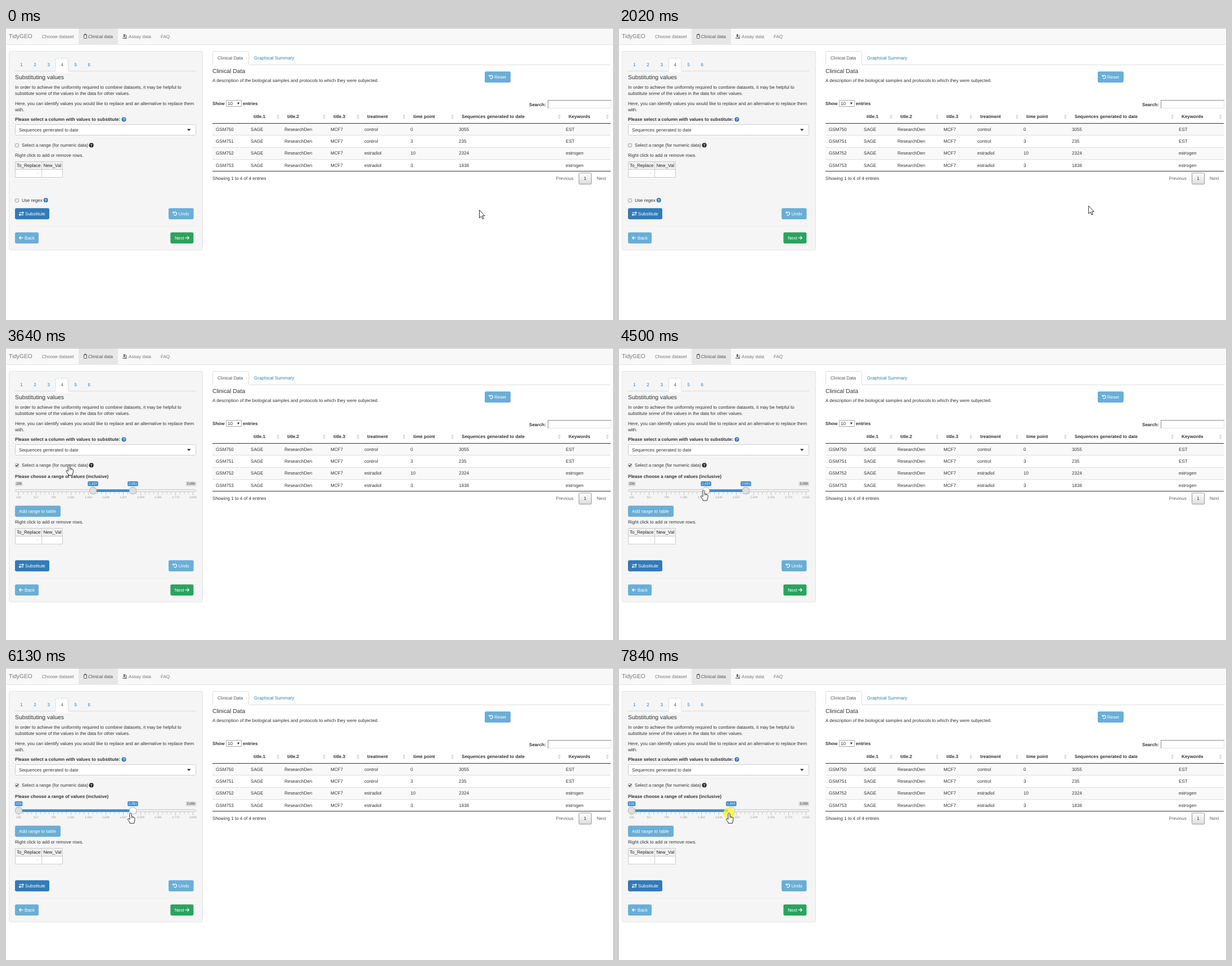
An HTML page with a canvas that plays this animation: 1079 px wide and 519 px high, repeating every 8000 ms.

```html
<!DOCTYPE html>
<html lang="en">
<head>
<meta charset="utf-8">
<title>TidyGEO</title>
<style>
html, body { margin: 0; width: 100%; height: 100%; overflow: hidden; background: #fff; }
canvas { display: block; }
</style>
</head>
<body>
<canvas id="stage" width="1079" height="519"></canvas>
<script>
const ctx = document.getElementById('stage').getContext('2d');
const LOOP = 8000, STEP = 77.4;
const BODY = 8.07, HEAD = 10.37;
const INK = '#333', LINK = '#337ab7', SKY = '#6aaed6', BAR = '#428bca';

function text(str, x, y, { size = BODY, color = INK, bold = false, align = 'left' } = {}) {
  ctx.font = `${bold ? 'bold ' : ''}${size}px "Liberation Sans", Arial, sans-serif`;
  ctx.fillStyle = color;
  ctx.textAlign = align;
  ctx.fillText(str, x, y);
}

function rect(x, y, w, h, color) {
  ctx.fillStyle = color;
  ctx.fillRect(x, y, w, h);
}

function pill(x, y, w, h, r, fill) {
  ctx.beginPath();
  ctx.roundRect(x, y, w, h, r);
  ctx.fillStyle = fill;
  ctx.fill();
}

function box(x, y, w, h, fill, stroke, r = 0) {
  pill(x + .5, y + .5, w - 1, h - 1, r, fill);
  ctx.strokeStyle = stroke;
  ctx.lineWidth = 1;
  ctx.stroke();
}

// Triangle with a flat base of width 2 * half centred on (x, y); negative height points up.
function triangle(x, y, half, height, fill) {
  ctx.beginPath();
  ctx.moveTo(x - half, y);
  ctx.lineTo(x + half, y);
  ctx.lineTo(x, y + height);
  ctx.fillStyle = fill;
  ctx.fill();
}

function line(points, color, width = 1) {
  ctx.beginPath();
  points.forEach(([x, y]) => ctx.lineTo(x, y));
  ctx.strokeStyle = color;
  ctx.lineWidth = width;
  ctx.stroke();
}

function arc(x, y, r, start, end, color, width) {
  ctx.beginPath();
  ctx.arc(x, y, r, start, end);
  ctx.strokeStyle = color;
  ctx.lineWidth = width;
  ctx.stroke();
}

function disc(x, y, r, fill) {
  ctx.beginPath();
  ctx.arc(x, y, r, 0, Math.PI * 2);
  ctx.fillStyle = fill;
  ctx.fill();
}

function help(x, y, color) {
  disc(x, y, 4, color);
  text('?', x, y + 2.4, { size: 6.8, color: '#fff', bold: true, align: 'center' });
}

function checkbox(x, y, checked) {
  box(x, y, 7, 7, checked ? '#fff' : '#ececec', '#a3a3a3', 1);
  if (checked) line([[x + 1.5, y + 3.5], [x + 3, y + 5], [x + 5.7, y + 1.6]], '#222', 1.3);
}

function undoIcon(x, y) {
  arc(x, y, 2.9, -2.5, 2.4, '#fff', 1.2);
  line([[x - 3.4, y - 4], [x - 3.4, y - 1], [x - .4, y - 1]], '#fff', 1.2);
}

// Horizontal arrow whose head points along dir (1 right, -1 left).
function arrowIcon(x, y, dir, half, head) {
  const tip = x + dir * half;
  line([[x - dir * half, y], [tip, y]], '#fff', 1.2);
  line([[tip - dir * head, y - head], [tip, y], [tip - dir * head, y + head]], '#fff', 1.2);
}

function button(label, x, y, w, textX, fill) {
  pill(x, y + .2, w, 19.7, 2.3, fill);
  text(label, textX, y + 12.6, { color: '#fff' });
}

function navbar() {
  rect(0, 0, 1079, 29, '#f8f8f8');
  rect(0, 29, 1079, 1, '#e5e5e5');
  rect(129, 0, 70, 29, '#e7e7e7');
  rect(0, 0, 1079, 1, '#c4c4c4');
  const grey = { color: '#777' };
  text('TidyGEO', 5, 18, { size: 10.25, color: '#777' });
  text('Choose dataset', 64, 17.6, grey);
  text('Clinical data', 146, 17.6, { color: '#555' });
  text('Assay data', 218, 17.6, grey);
  text('FAQ', 275, 17.6, grey);
  box(138, 11, 6, 8, '#e7e7e7', '#555', 1);
  rect(139.5, 10.5, 3, 2.2, '#555');
  rect(207, 17.5, 8, 1.3, '#666');
  rect(209, 11, 2.6, 5, '#666');
  arc(211, 15, 3, -1, 1.4, '#666', 1.1);
}

function tab(x, y, w, h) {
  box(x, y, w, h + 2, '#fff', '#ddd', 2);
  rect(x, y + h, w, 3, '#fff');
}

const COLUMNS = [
  ['title.1', 435], ['title.2', 495], ['title.3', 577], ['treatment', 637],
  ['time point', 719], ['Sequences generated to date', 805], ['Keywords', 995]
];
const ROWS = [
  ['GSM750', 'control', '0', '3055', 'EST'],
  ['GSM751', 'control', '3', '235', 'EST'],
  ['GSM752', 'estradiol', '10', '2324', 'estrogen'],
  ['GSM753', 'estradiol', '3', '1838', 'estrogen']
];
const TABLE = { x: 367, y: 169, w: 708, row: 21.3 };

function dataTable(pointer) {
  const { x: left, y: head, w, row } = TABLE;
  const hovered = pointer.x > left ? Math.floor((pointer.y - head) / row) : -1;
  COLUMNS.forEach(([title, x], i) => {
    const next = COLUMNS[i + 1]?.[1] ?? 1080.5;
    text(title, x + 5, 160, { bold: true });
    triangle(next - 11.5, 157, 2.3, -3.3, '#d0d0d0');
    triangle(next - 11.5, 158.4, 2.3, 3.3, '#d0d0d0');
  });
  ROWS.forEach(([id, treatment, time, sequences, keyword], r) => {
    const top = head + r * row, y = top + 13.8;
    if (r === hovered) rect(left, top, w, row, '#f3f3f3');
    else if (r % 2 === 0) rect(left, top, w, row, '#f9f9f9');
    if (r) rect(left, Math.round(top), w, 1, '#ddd');
    text(id, 373, y);
    ['SAGE', 'ResearchDen', 'MCF7', treatment, time, sequences, keyword]
      .forEach((value, i) => text(value, COLUMNS[i][1], y));
  });
  rect(left, head, w, 1, '#333');
  rect(left, 254, w, 1, '#333');
}

function dataPane(pointer) {
  rect(367, 65, 708, 1, '#ddd');
  tab(367, 41, 65, 24);
  text('Clinical Data', 376, 56, { color: '#555' });
  text('Graphical Summary', 441, 56, { color: LINK });
  text('Clinical Data', 367, 79.5, { size: HEAD });
  text('A description of the biological samples and protocols to which they were subjected.', 367, 96.4);
  button('Reset', 851, 77, 46, 868, SKY);
  undoIcon(862.5, 87);

  const bold = { bold: true };
  text('Show', 367, 136.5, bold);
  box(391, 128, 28, 12, '#fff', '#aaa');
  text('10', 394, 136.7);
  triangle(413, 132.5, 2, 3.5, '#222');
  text('entries', 421, 136.5, bold);
  text('Search:', 930, 138.5, bold);
  box(963, 128, 113, 15, '#fff', '#e3e3e3');
  rect(963, 128, 113, 1, '#8c8c8c');
  rect(963, 128, 1, 15, '#8c8c8c');

  dataTable(pointer);

  text('Showing 1 to 4 of 4 entries', 367, 269.6);
  text('Previous', 977.5, 270.2, { color: '#666' });
  const shade = ctx.createLinearGradient(0, 257, 0, 278);
  shade.addColorStop(0, '#fff');
  shade.addColorStop(1, '#dcdcdc');
  box(1018, 257, 23, 21, shade, '#979797', 1);
  text('1', 1029.5, 270.2, { align: 'center' });
  text('Next', 1050, 270.2, { color: '#666' });
}

const MIN = 235, MAX = 3055, TRACK = 22.5, SPAN = 310;
const valueX = v => TRACK + (v - MIN) / (MAX - MIN) * SPAN;
const xValue = x => Math.round(Math.min(MAX, Math.max(MIN, MIN + (x - TRACK) / SPAN * (MAX - MIN))));
const commas = v => Math.round(v).toLocaleString('en-US');

// Value bubble; anchor 0, .5 or 1 pins its left, middle or right to x.
function tag(value, x, fill, color, anchor = .5) {
  const str = commas(value), size = 5.9;
  ctx.font = `${size}px "Liberation Sans", Arial, sans-serif`;
  const w = ctx.measureText(str).width + 3.8, left = x - w * anchor;
  pill(left, 237, w, 8.6, 1.8, fill);
  text(str, left + w / 2, 243.4, { size, color, align: 'center' });
}

function slider(from, to, pointer) {
  const a = valueX(from), b = valueX(to);
  box(16, 251, 322, 5, '#eee', '#ccc', 2);
  rect(a, 251.3, b - a, 4.6, BAR);
  for (let i = 0; i <= 40; i++) {
    const major = i % 4 === 0, x = TRACK + i * SPAN / 40;
    rect(x - .3, 256.5, .6, major ? 5 : 3, '#999');
    if (major) text(commas(MIN + i * 70.5), x, 267.2, { size: 5.2, color: '#999', align: 'center' });
  }
  if (a > 42) tag(MIN, 16, '#dcdcdc', INK, 0);
  tag(MAX, 338, '#dcdcdc', INK, 1);
  for (const [value, x] of [[from, a], [to, b]]) {
    const hover = Math.hypot(pointer.x - x, pointer.y - 253.5) < 7.5;
    tag(value, x, BAR, '#fff');
    disc(x, 253.5, 6.7, '#a9a9a9');
    disc(x, 253.5, 5.9, hover ? '#fff' : '#dedede');
  }
}

function entryTable(y) {
  text('Right click to add or remove rows.', 16, y - 7.8);
  box(16, y, 85, 15, '#f0f0f0', '#ccc');
  box(16, y + 14, 85, 15, '#fff', '#ccc');
  rect(63, y, 1, 29, '#ccc');
  text('To_Replace', 19, y + 10, { color: '#222' });
  text('New_Val', 66.5, y + 10, { color: '#222' });
  triangle(56.1, y + 20, 1.6, 3, '#e4e4e4');
}

function sidePanel(s) {
  const shift = s.open ? 57 : 0;
  box(5, 41, 345, 354 + shift, '#f5f5f5', '#e3e3e3', 2);
  rect(16, 76, 322, 1, '#ddd');
  tab(88, 53, 23, 23);
  for (let i = 1; i <= 6; i++) {
    text(i, 3.5 + i * 24.05, 67.7, { color: i === 4 ? '#555' : LINK, align: 'center' });
  }
  text('Substituting values', 16, 91, { size: HEAD });
  text('In order to achieve the uniformity required to combine datasets, it may be helpful to', 16, 107.7);
  text('substitute some of the values in the data for other values.', 16, 119.3);
  text('Here, you can identify values you would like to replace and an alternative to replace them', 16, 136.6);
  text('with.', 16, 148.2);
  text('Please select a column with values to substitute:', 16, 165.2, { bold: true });
  help(209.5, 162.5, LINK);
  box(16, 171, 322, 20, '#fff', '#ccc', 2);
  text('Sequences generated to date', 23, 183.7);
  triangle(325.2, 179.5, 3.3, 3.5, '#222');
  checkbox(16, 205, s.checked);
  text('Select a range (for numeric data)', 28, 211);
  help(151.7, 208.2, '#222');

  if (s.open) {
    text('Please choose a range of values (inclusive)', 16, 231.2, { bold: true });
    slider(s.from, s.to, s);
    button('Add range to table', 16, 280, 81, 23, SKY);
    entryTable(320);
  } else {
    entryTable(237);
    checkbox(16, 303, false);
    text('Use regex', 28, 309);
    help(70.7, 306.1, LINK);
  }

  const y = 320 + shift;
  button('Substitute', 16, y, 61, 34, LINK);
  arrowIcon(27.3, y + 8.2, 1, 3.8, 1.8);
  arrowIcon(27.3, y + 12, -1, 3.8, 1.8);
  button('Undo', 289, y, 44.5, 306.5, SKY);
  undoIcon(300.5, y + 10);
  rect(16, y + 31, 322, 1, '#eee');
  button('Back', 16, y + 43, 42, 33, SKY);
  arrowIcon(27, y + 53, -1, 3.3, 2.8);
  button('Next', 292.3, y + 43, 41, 300, '#2ca25f');
  arrowIcon(322, y + 53, 1, 3.3, 2.8);
}

const ARROW = new Path2D('M.5 .5V14.6L3.7 11.6 6 16.6 8.1 15.7 5.9 10.8H10.2Z');
const HAND = new Path2D('M-1.6 1Q0-2 1.6 1V6Q3.4 5.2 4 6.8 5.6 6.2 6 7.8 7.4 7.5 7.4 9.2V12.4L6 18H-1.4V16.4L-5 11.4Q-4.6 8-1.6 11.2Z');

function drawPointer(s) {
  if (s.pressed) disc(s.x, s.y, 10.2, 'rgba(255,241,50,.78)');
  ctx.save();
  ctx.translate(s.x, s.y);
  const shape = s.hand ? HAND : ARROW;
  ctx.fillStyle = '#fff';
  ctx.fill(shape);
  ctx.strokeStyle = '#222';
  ctx.lineWidth = .95;
  ctx.lineJoin = 'round';
  ctx.stroke(shape);
  if (s.hand) {
    for (const x of [1.6, 4]) line([[x, 6.5], [x, 9]], '#222', .8);
  }
  ctx.restore();
}

// Pointer keys: [ms, x, y]
const KEYS = [
  [0, 841, 323], [300, 841, 323],
  // up and down across the table rows
  [780, 800, 107], [1328, 776, 249], [1560, 790, 156], [1940, 845, 285],
  // round below the table to the range checkbox
  [2130, 800, 339], [2560, 360, 262], [2780, 194, 201], [2850, 194, 201], [3160, 112, 208], [3990, 112, 208],
  // drag the lower handle
  [4490, 150.6, 253], [4715, 150.6, 254], [5043, 51, 264], [5270, 15, 264], [5540, 14, 264],
  // drag the upper handle
  [5980, 241, 258], [6125, 221.5, 258], [6750, 221.5, 258], [7470, 197.5, 258], [7825, 195.6, 258], [LOOP, 195.6, 258]
];

const rate = (i, axis) => (KEYS[i + 1][axis] - KEYS[i][axis]) / (KEYS[i + 1][0] - KEYS[i][0]);

// Speed at a key: zero at rests and turning points.
function tangent(i, axis) {
  if (i === 0 || i === KEYS.length - 1) return 0;
  const a = rate(i - 1, axis), b = rate(i, axis);
  return a * b > 0 ? 2 * a * b / (a + b) : 0;
}

function glide(t, axis) {
  const i = KEYS.findIndex(key => key[0] > t) - 1;
  const [a, b] = [KEYS[i], KEYS[i + 1]];
  const span = b[0] - a[0], u = (t - a[0]) / span, v = 1 - u;
  return a[axis] * (1 + 2 * u) * v * v + b[axis] * u * u * (3 - 2 * u)
    + span * u * v * (tangent(i, axis) * v - tangent(i + 1, axis) * u);
}

function stateAt(ms) {
  const t = Math.min(LOOP - 1, Math.floor(ms / STEP) * STEP + 12);
  const x = glide(t, 1), y = glide(t, 2);
  const within = (a, b) => t >= a && t < b;
  const grabbed = xValue(x + 3.9);
  const open = t >= 3560;
  return {
    x, y, open,
    checked: open,
    from: t < 4725 ? 1437 : t < 5290 ? grabbed : MIN,
    to: t < 6760 ? 2081 : grabbed,
    pressed: within(3490, 3630) || within(4725, 5420) || t >= 6660,
    hand: (x < 157 && within(2860, 4200) && y < 214) || (t > 4200 && y > 245)
  };
}

function frame(now) {
  const s = stateAt(now % LOOP);
  rect(0, 0, 1079, 519, '#fff');
  navbar();
  sidePanel(s);
  dataPane(s);
  drawPointer(s);
  requestAnimationFrame(frame);
}

ctx.textRendering = 'geometricPrecision';
requestAnimationFrame(frame);
</script>
</body>
</html>
```
